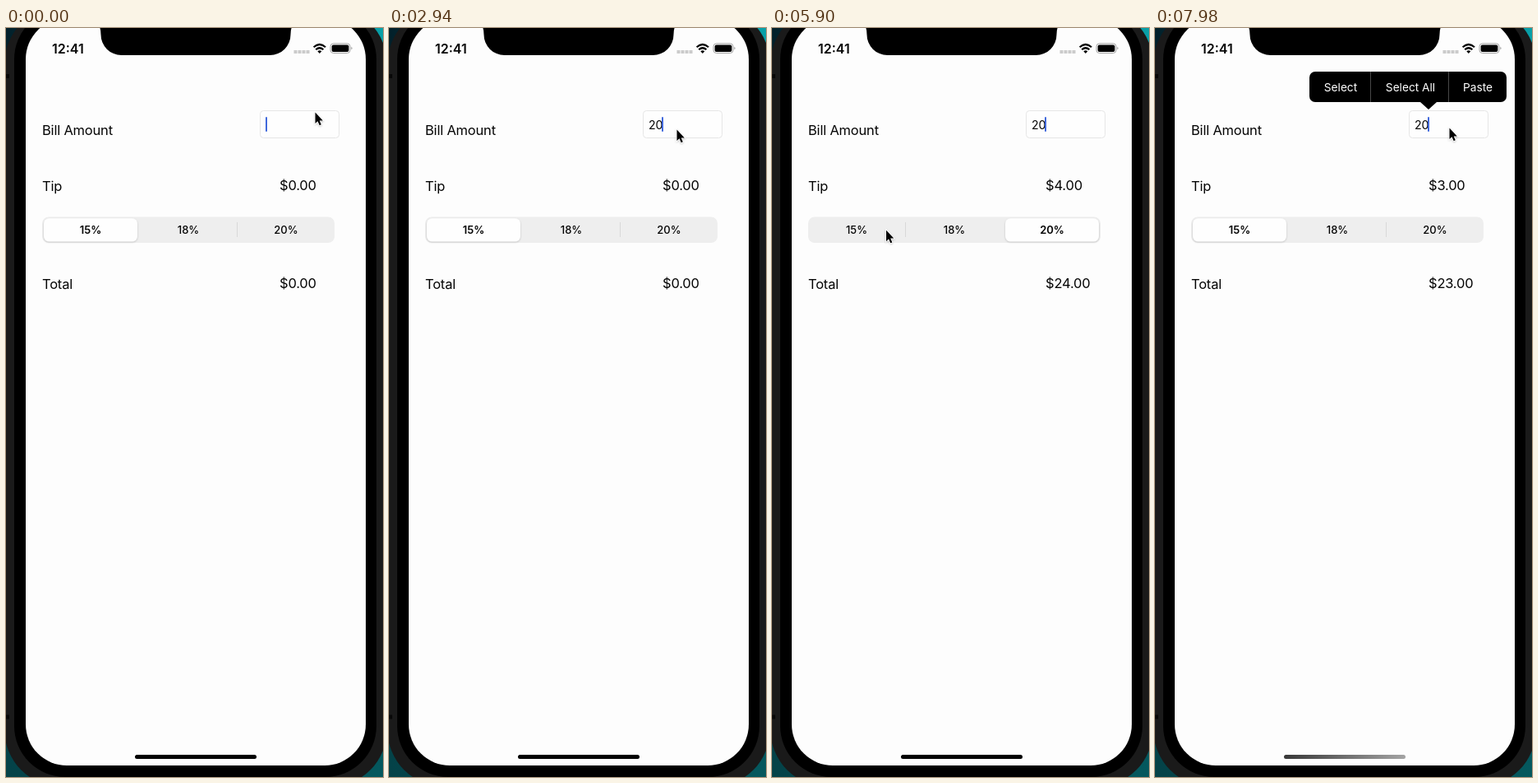
An HTML page for the animation above (8 s loop, 459 by 910 pixels).

```html
<!DOCTYPE html>
<html lang="en">
<head>
<meta charset="utf-8">
<title>Tip calculator</title>
<style>
  html, body { margin: 0; width: 100%; height: 100%; overflow: hidden; background: #000; }
  svg { display: block; width: 100vw; height: 100vh; }
  text { font: 400 16.5px Inter, "Liberation Sans", sans-serif; letter-spacing: -.2px; fill: #050505; }
  .clock { font-size: 16px; font-weight: 600; letter-spacing: 0; }
  .seg { font-size: 13px; font-weight: 500; letter-spacing: 0; text-anchor: middle; }
  .seg.on { font-weight: 600; }
  .entry { font-size: 14.2px; letter-spacing: -.1px; }
  .menu text { font-size: 13.7px; letter-spacing: 0; fill: #fff; text-anchor: middle; }
</style>
</head>
<body>
<svg viewBox="0 0 459 910">
  <defs>
    <linearGradient id="sky">
      <stop offset="0" stop-color="#02202a"/>
      <stop offset="1" stop-color="#08a0a8"/>
    </linearGradient>
    <linearGradient id="ground">
      <stop offset="0" stop-color="#044248"/>
      <stop offset="1" stop-color="#04585e"/>
    </linearGradient>
    <linearGradient id="shine">
      <stop offset="0" stop-color="#383838"/>
      <stop offset="1" stop-color="#a4a4a4"/>
    </linearGradient>
    <filter id="lift" x="-10%" y="-20%" width="120%" height="150%">
      <feDropShadow dx="0" dy="1" stdDeviation="1" flood-opacity=".2"/>
    </filter>
    <filter id="soft" x="-40%" y="-30%" width="200%" height="180%">
      <feDropShadow dx="0" dy="1" stdDeviation=".8" flood-opacity=".25"/>
    </filter>
  </defs>

  <!-- desktop and phone body -->
  <rect width="459" height="455" fill="url(#sky)"/>
  <rect y="455" width="459" height="455" fill="url(#ground)"/>
  <rect x="-2" y="-26" width="466" height="948" rx="70" fill="#1a1a1a"/>
  <path d="M0 58.5H4M0 837H4" stroke="#080808" stroke-width="5"/>
  <rect x="10" y="-24" width="441" height="934" rx="62"/>
  <rect x="24" y="-12" width="414" height="908" rx="50" fill="#fdfdfd"/>
  <path d="M114 -1Q115.500 2 115.500 8A25 25 0 0 0 140.500 33H321.500A25 25 0 0 0 346.500 8Q346.500 2 348 -1Z"/>

  <!-- status bar -->
  <text class="clock" x="56" y="30.700">12:41</text>
  <path d="M350.500 29H370" stroke="#cbcbcb" stroke-width="4" stroke-dasharray="4 1"/>
  <g fill="none" stroke="#000" stroke-width="2.200">
    <path d="M374.600 23.300Q381.800 16.700 389 23.300"/>
    <path d="M377.200 26.300Q381.800 22.200 386.400 26.300"/>
  </g>
  <path d="M379.300 28.300Q381.800 26.300 384.300 28.300L381.800 30.900Z"/>
  <rect x="395" y="18.900" width="24" height="11.600" rx="3.600" fill="none" stroke="#a3a3a3"/>
  <rect x="396.600" y="20.500" width="20.800" height="8.400" rx="2"/>
  <path d="M420.300 22.700Q423 24.500 420.300 26.300Z" fill="#a3a3a3"/>

  <!-- form -->
  <text x="44" y="129.800">Bill Amount</text>
  <text x="44" y="197.600">Tip</text>
  <text x="44" y="316.600">Total</text>
  <text id="tip" x="333" y="196.700"></text>
  <text id="total" x="333" y="315.700"></text>
  <rect x="309.500" y="100.500" width="96" height="33" rx="4" fill="#fefefe" stroke="#e6e6e6"/>
  <text id="entry" class="entry" x="316" y="122.500"></text>
  <rect id="caret" y="108" width="2" height="18" rx="1" fill="#4169dc"/>

  <!-- rate picker -->
  <rect x="44" y="229.500" width="356" height="31.500" rx="8" fill="#eeeeee"/>
  <path id="div1" d="M162.500 236V254" stroke="#d8d8d8"/>
  <path id="div2" d="M281.500 236V254" stroke="#d8d8d8"/>
  <rect id="thumb" y="231.300" width="114" height="28" rx="6.500" fill="#fefefe" filter="url(#lift)"/>
  <text class="seg" x="103" y="249.500">15%</text>
  <text class="seg" x="222" y="249.500">18%</text>
  <text class="seg" x="341" y="249.500">20%</text>

  <rect id="home" x="157" y="883" width="148" height="5" rx="2.500"/>

  <!-- edit menus -->
  <g id="small" class="menu">
    <rect x="282" y="53" width="70" height="37" rx="7"/>
    <path d="M307 90H327L317 99Z"/>
    <text x="317" y="76.800">Paste</text>
  </g>
  <g id="wide" class="menu">
    <rect x="188" y="53" width="240" height="37" rx="7"/>
    <path d="M323 90H343L333 99Z"/>
    <path d="M262.500 53V90M357.500 53V90" stroke="#484848"/>
    <text x="226" y="76.800">Select</text>
    <text x="311" y="76.800">Select All</text>
    <text x="393" y="76.800">Paste</text>
  </g>

  <path id="pointer" d="M.5 1.500V15L3.500 12.200L5.700 17.200L7.800 16.300L5.700 11.400H9.800Z"
        stroke="#fff" stroke-width="1.400" paint-order="stroke" filter="url(#soft)"/>
</svg>

<script>
const LOOP = 8000, TICK = 147.6;
const $ = id => document.getElementById(id);
const set = (id, name, value) => $(id).setAttribute(name, value);
const segs = document.querySelectorAll('.seg');
const rates = [15, 18, 20];
const BILL = '20';

const clamp = v => Math.min(1, Math.max(0, v));
const ramp = (t, from, span) => clamp((t - from) / span);
const ease = p => p * p * (3 - 2 * p);
const mix = (a, b, p) => a + (b - a) * p;

const home = { x: 376, y: 101 };
const moves = [
  { from: 0, to: 590, x: 350, y: 122 },
  { from: 3250, to: 3980, x: 226, y: 244 },
  { from: 4710, to: 5160, x: 338, y: 245 },
  { from: 5560, to: 6010, x: 106, y: 244 },
  { from: 6340, to: 6790, x: 421, y: 101 },
  { from: 6860, to: 7300, x: 358, y: 120 }
];
const taps = [{ at: 4100, pick: 1 }, { at: 5280, pick: 2 }, { at: 6170, pick: 0 }];
const menus = [
  { id: 'small', open: 950, close: 1250 },
  { id: 'wide', open: 7740, close: LOOP }
];

function pointerAt(t) {
  return moves.reduce((p, m) => {
    const k = ease(ramp(t, m.from, m.to - m.from));
    return { x: mix(p.x, m.x, k), y: mix(p.y, m.y, k) };
  }, home);
}

// the caret stays lit while typing, otherwise it blinks softly
function caretAlpha(t) {
  if (t > 1200 && t < 2400) return 1;
  const period = 980, half = period / 2;
  const gap = Math.abs((t + 730) % period - half);
  return ramp(gap, 110, 120);
}

function fadeMenu({ id, open, close }, t) {
  const alpha = ramp(t, open, 220) * (1 - ramp(t, close, 330));
  set(id, 'opacity', alpha);
  $(id).querySelectorAll('text').forEach(e => e.setAttribute('opacity', alpha));
}

function drawPicker(t) {
  const done = taps.filter(tap => t >= tap.at);
  const pick = done.length ? done.at(-1).pick : 0;
  const pos = taps.reduce((p, tap) => mix(p, tap.pick, ease(ramp(t, tap.at, 220))), 0);
  set('thumb', 'x', 46 + 119 * pos);
  set('div1', 'opacity', pos > 1.7 ? 1 : 0);
  set('div2', 'opacity', pos < .3 ? 1 : 0);
  segs.forEach((e, i) => e.classList.toggle('on', i === pick));

  const bill = done.length ? Number(BILL) : 0;
  const tip = bill * rates[pick] / 100;
  $('tip').textContent = '$' + tip.toFixed(2);
  $('total').textContent = '$' + (bill + tip).toFixed(2);
}

function draw(time) {
  const t = Math.floor((time + 15) / TICK) * TICK;
  const { x, y } = pointerAt(t);
  set('pointer', 'transform', `translate(${x} ${y})`);

  const count = Math.floor(3 * ramp(t, 1050, 1200));
  const entry = BILL.slice(0, count);
  $('entry').textContent = entry;
  set('caret', 'x', 316 + 8 * entry.length);
  set('caret', 'opacity', caretAlpha(t));

  drawPicker(t);
  menus.forEach(m => fadeMenu(m, t));
  const glow = menus.some(m => t > m.open && t < m.open + 235);
  set('home', 'fill', glow ? 'url(#shine)' : '#000');
}

const start = performance.now();
function frame() {
  draw((performance.now() - start) % LOOP);
  requestAnimationFrame(frame);
}
frame();
</script>
</body>
</html>
```
